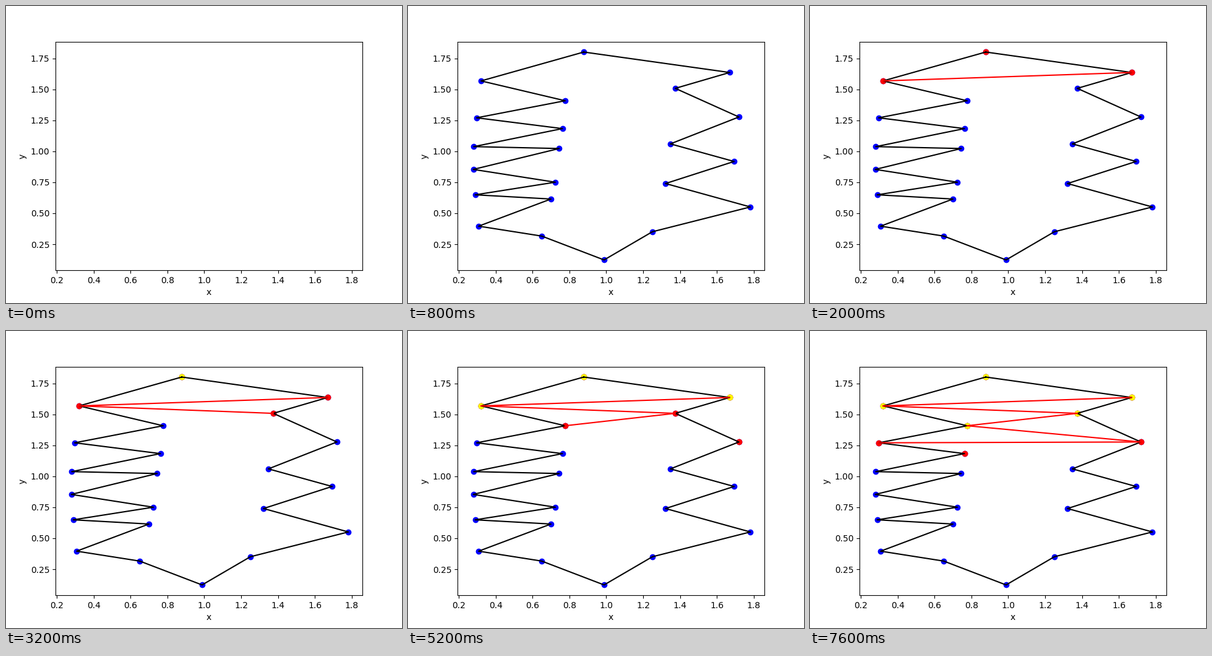
These frames come from a looping animation (640 by 480 pixels, 8000 ms). A matplotlib script:

```python
import matplotlib.pyplot as plt
import numpy as np
from matplotlib.animation import FuncAnimation

FRAMES = 20
INTERVAL = 400


def chain(count, start, end, x_bow=0, y_waves=()):
    """Corner points from start to end, bent by sine waves of rising order."""
    t = np.linspace(0, 1, count)
    x = start[0] + (end[0] - start[0]) * t + x_bow * np.sin(np.pi * t)
    y = start[1] + (end[1] - start[1]) * t
    for order, height in enumerate(y_waves, 1):
        y += height * np.sin(order * np.pi * t)
    return np.column_stack([x, y])


def zigzag(first, second):
    """Alternate between two chains; the first may be one point longer."""
    points = np.empty((len(first) + len(second), 2))
    points[::2] = first
    points[1::2] = second
    return points


top = (0.878, 1.801)
base = [(0.650, 0.316), (0.988, 0.1235), (1.250, 0.351), (1.781, 0.551)]
left = zigzag(
    chain(6, (0.321, 1.568), (0.308, 0.396), x_bow=-0.036, y_waves=(-0.038, -0.043)),
    chain(5, (0.777, 1.408), (0.700, 0.615), x_bow=0.006, y_waves=(-0.026, 0.018, -0.037)),
)
right = zigzag(
    chain(3, (1.321, 0.740), (1.374, 1.508), y_waves=(-0.064,)),
    chain(3, (1.693, 0.918), (1.669, 1.636), x_bow=0.038),
)
polygon = np.vstack([top, left, base, right])

fig, ax = plt.subplots(figsize=(6.4, 4.8), dpi=100)
ax.set(xlabel="x", ylabel="y", xlim=(0.1934, 1.8572), ylim=(0.0396, 1.8849))

timeline = []  # (first frame, artist)


def add_dots(start, points, color):
    timeline.append((start, ax.scatter(*np.transpose(points), color=color)))


def add_line(start, points, color):
    timeline.append((start, ax.plot(*np.transpose(points), color=color)[0]))


add_dots(1, polygon, "blue")
add_line(2, np.vstack([polygon, top]), "black")

# Sweep downwards: visit a vertex, add a diagonal, retire the oldest vertex.
sweep = polygon[np.argsort(-polygon[:, 1])]
add_dots(3, sweep[:2], "red")
for k, start in enumerate(range(4, FRAMES, 3)):
    add_dots(start, sweep[k + 2], "red")
    add_line(start + 1, sweep[k + 1:k + 3], "red")
    add_dots(start + 2, sweep[k], "yellow")


def update(frame):
    for start, artist in timeline:
        artist.set_visible(frame >= start)
    return [artist for _, artist in timeline]


animation = FuncAnimation(fig, update, frames=FRAMES, interval=INTERVAL,
                          repeat=True, repeat_delay=0)
plt.show()
```
